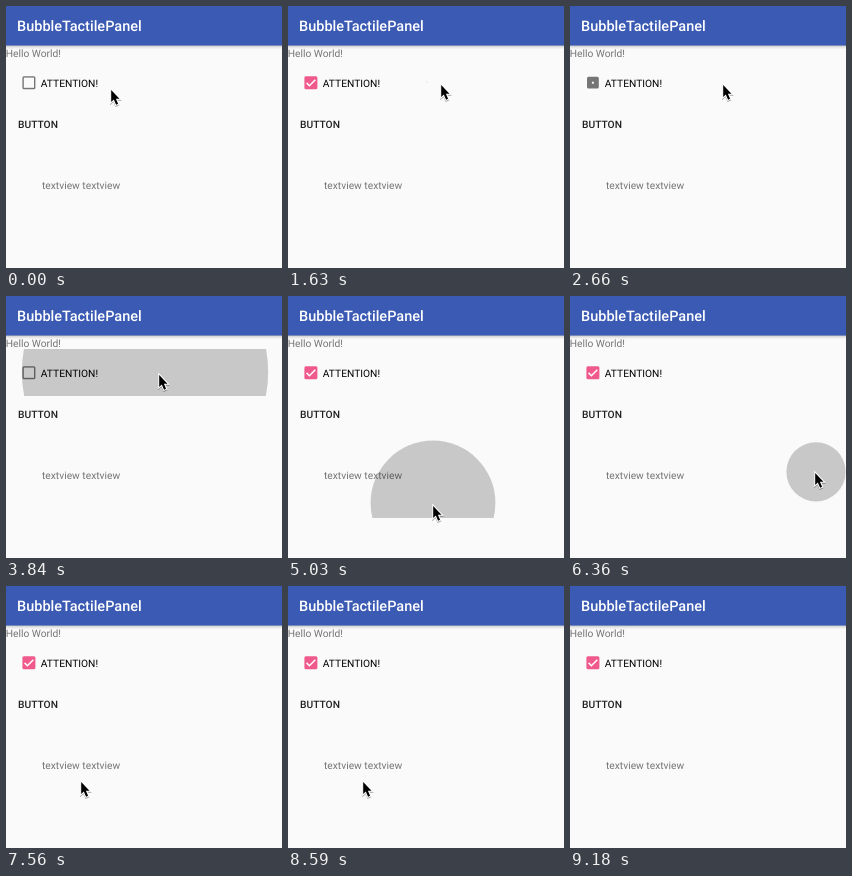
Recreate the animation shown at these times as an HTML page. Size 276 by 262 pixels, loop 9780 ms.

```html
<!DOCTYPE html>
<html lang="en">
<head>
<meta charset="utf-8">
<title>Ripple demo</title>
<style>
  html, body { margin: 0; width: 100%; height: 100%; overflow: hidden; background: #fafafa; }
  svg { display: block; width: 276px; height: 262px; }
  text { font-family: Roboto, "Noto Sans", sans-serif; font-size: 10.25px; text-rendering: geometricPrecision; }
  .title { font-size: 14.5px; font-weight: 500; fill: #fff; }
  .soft { fill: #757575; }
  .button { font-weight: 500; fill: #212121; }
  #cursor { filter: drop-shadow(0 1px .7px rgba(0, 0, 0, .35)); }
</style>
</head>
<body>
<svg viewBox="0 0 276 262">
  <defs>
    <linearGradient id="shade" x2="0" y2="1">
      <stop offset="0" stop-color="#000" stop-opacity=".3"/>
      <stop offset=".4" stop-color="#000" stop-opacity=".1"/>
      <stop offset="1" stop-color="#000" stop-opacity="0"/>
    </linearGradient>
    <clipPath id="upper"><rect y="53" width="276" height="47"/></clipPath>
    <clipPath id="lower"><rect y="135" width="276" height="87"/></clipPath>
  </defs>

  <rect width="276" height="262" fill="#fafafa"/>
  <text class="soft" x="-.3" y="50.6">Hello World!</text>
  <rect y="39" width="276" height="4.5" fill="url(#shade)"/>
  <rect width="276" height="39.5" fill="#3b5ab3"/>
  <text class="title" x="11" y="25.3">BubbleTactilePanel</text>

  <g transform="translate(22.9 76.7)">
    <rect id="box" rx="1.5"/>
    <rect id="hole" fill="#fafafa"/>
    <path id="mark" d="M-4.3 .2L-1.5 3L4.4 -2.9" pathLength="1" stroke-dasharray="1 2"
          fill="none" stroke="#fff" stroke-width="1.5"/>
  </g>
  <text x="34.8" y="80.6" fill="#000">ATTENTION!</text>
  <text class="button" x="12" y="121.6">BUTTON</text>
  <text class="soft" x="36" y="182.6">textview textview</text>

  <g id="row"><circle id="ripple" fill="#000" fill-opacity=".2"/></g>
  <path id="cursor" d="M1.2 2V14L3.8 11.5L6.1 16.7L8.1 15.8L5.9 10.7H9.5Z"
        fill="#000" stroke="#fff" stroke-width="2" paint-order="stroke"/>
</svg>

<script>
const LOOP = 9780, TICK = 148.06, TRAVEL = 2;
const $ = id => document.getElementById(id);
const clamp = v => Math.max(0, Math.min(1, v));
const set = (el, attrs) => {
  for (const name in attrs) el.setAttribute(name, attrs[name]);
};

// Pointer stops, reached at a given tick
const stops = [
  { at: 1, x: 107, y: 79 }, { at: 6, x: 80, y: 76 }, { at: 11, x: 152, y: 77 },
  { at: 30, x: 144, y: 208 }, { at: 42, x: 244, y: 175 }, { at: 48, x: 74, y: 194 },
  { at: 60, x: 86, y: 204 }, { at: 62, x: -70, y: 142 }
];

// Tapped places and the ticks at which ripples are born there
const taps = [
  { x: 139, y: 76, born: [10.98, 20.6] },
  { x: 145, y: 207, born: [31, 33.22, 37.2] },
  { x: 246, y: 175.8, born: [42.63] },
  { x: 75, y: 194.5, born: [49.91, 53.03, 55.7, 58.1] }
];

const toggles = [6, 18, 26];

const square = (el, size) =>
  set(el, { x: -size / 2, y: -size / 2, width: size, height: size });

function drawCursor(k) {
  let x = 101, y = 85;
  for (const stop of stops) {
    const f = clamp((k - stop.at) / TRAVEL + 1);
    x += (stop.x - x) * f;
    y += (stop.y - y) * f;
  }
  set($("cursor"), { transform: `translate(${Math.round(x)} ${Math.round(y)})` });
}

// A ripple grows at a steady rate and vanishes at its reach
function drawRipple(k) {
  set($("ripple"), { r: 0 });
  for (const { x, y, born } of taps) {
    const upper = y < 100, reach = Math.min(x + 5, 150);
    for (const start of born) {
      const r = (k - start) * (upper ? 28 : 80);
      if (r <= 0 || r > reach) continue;
      set($("row"), { "clip-path": `url(#${upper ? "upper" : "lower"})` });
      set($("ripple"), { cx: x, cy: y, r });
    }
  }
}

// Each toggle takes three ticks: the hole closes, then the mark is drawn
function drawCheck(k) {
  const past = toggles.filter(t => t <= k);
  const on = past.length % 2;
  const p = past.length ? clamp((k - past.pop() + 1) / 3) : 1;
  const hole = on ? clamp(1 - 2 * p) : p ** 1.5;
  const mark = on ? clamp(2 * p - 1) : 0;
  square($("box"), 13 - 1.4 * Math.sin(Math.PI * p));
  square($("hole"), hole * 10.2);
  set($("box"), { fill: on ? "#f0598b" : "#757575" });
  set($("mark"), { "stroke-dashoffset": 1 - mark, opacity: mark ? 1 : 0 });
}

// The screen updates in discrete ticks
function frame() {
  const t = performance.now() % LOOP;
  const k = Math.min(62, Math.floor(t / TICK + .05));
  drawCursor(k);
  drawRipple(k);
  drawCheck(k);
  requestAnimationFrame(frame);
}
frame();
</script>
</body>
</html>
```
